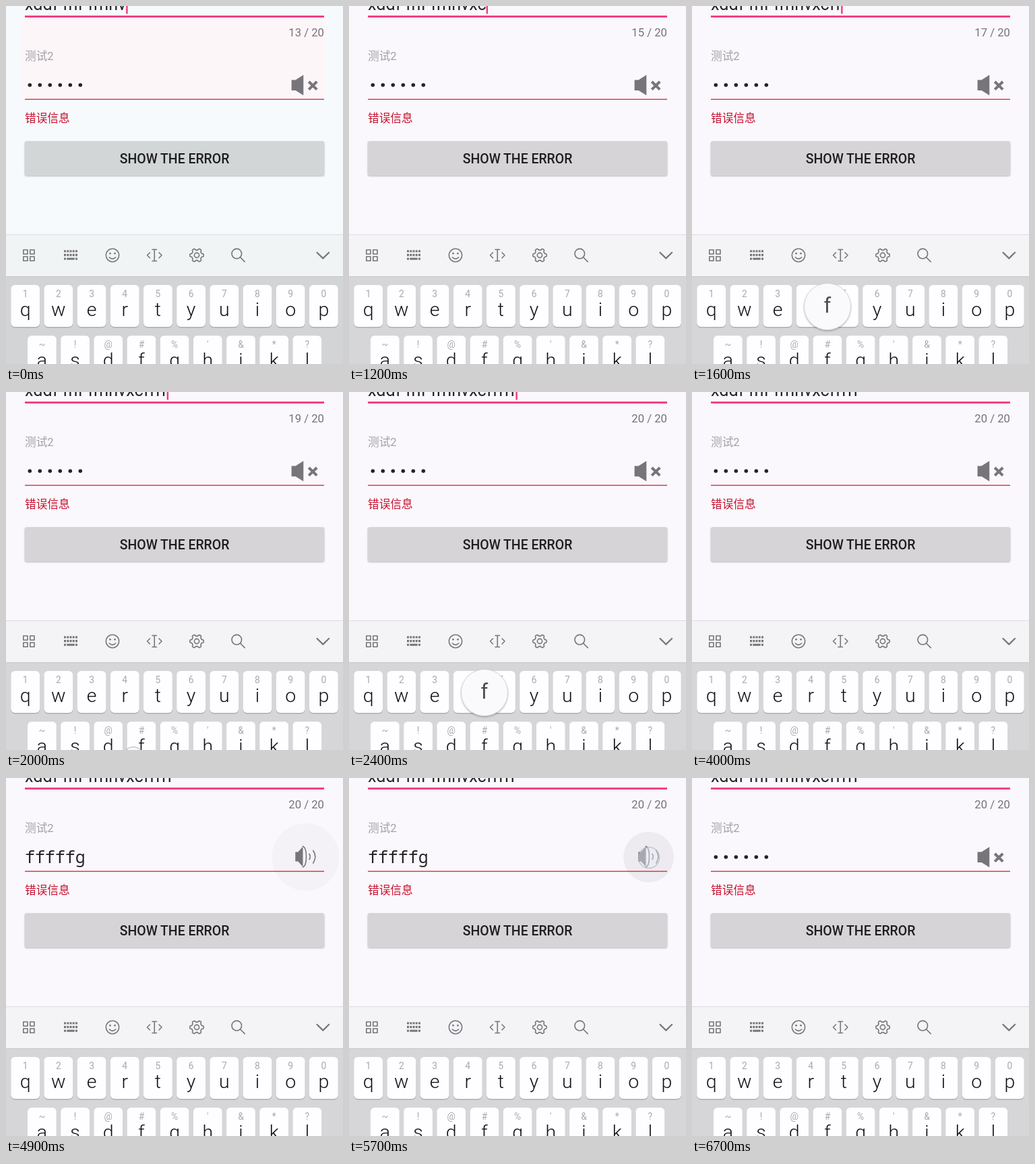
These frames come from a looping animation (500 by 530 pixels, 6.8 s). An HTML page:

```html
<!DOCTYPE html>
<html lang="en">
<head>
<meta charset="utf-8">
<title>Form with keyboard</title>
<style>
html, body { margin: 0; width: 100%; height: 100%; overflow: hidden; }
svg { display: block; font-family: Roboto, "Noto Sans CJK SC", "Noto Sans CJK", sans-serif; font-variant-ligatures: none;
  --page: #faf8fc; --field: #faf8fc; --btn: #d6d4d7; --bar: #f4f3f6; --board: #d6d5d8; }
svg.tint { --page: #f7fafc; --field: #fcf6f9; --btn: #d3d6d7; --bar: #f1f4f5; --board: #d2d4d6; }
.page { fill: var(--page); }
.field { fill: var(--field); }
.btn { fill: var(--btn); }
.bar { fill: var(--bar); }
.board { fill: var(--board); }
.icon { fill: none; stroke: #77757a; stroke-width: 1.6; stroke-linecap: round; stroke-linejoin: round; }
.solid { fill: #77757a; stroke: none; }
.flat { stroke-width: 3.1; stroke-linecap: butt; }
.small { font-size: 16.7px; }
.mid { text-anchor: middle; }
.hint { font-size: 13.8px; fill: #a9a8ac; }
.letter { font-size: 28.5px; font-weight: 300; fill: #111013; }
.mono { font: 300 24.9px "Noto Sans Mono", monospace; }
</style>
</head>
<body>
<svg id="stage" width="500" height="530" viewBox="0 0 500 530">
  <defs>
    <filter id="lift" x="-20%" y="-20%" width="140%" height="150%">
      <feDropShadow dx="0" dy="1.2" stdDeviation="1.3" flood-opacity=".33"/>
    </filter>
    <clipPath id="btnClip"><rect x="28" y="200" width="444" height="50.5" rx="2.5"/></clipPath>
  </defs>

  <rect class="page" width="500" height="530"/>
  <rect class="field" x="22" y="17" width="452" height="121"/>

  <text id="typed" x="28" y="6" font-size="25.2" fill="#242326"></text>
  <rect id="caret" y="0" width="2.4" height="11.5" fill="#f0397f"/>
  <rect x="28" y="14.2" width="444" height="2.8" fill="#f2397f"/>
  <text id="count" class="small" x="472" y="45" text-anchor="end" fill="#757378"></text>

  <text class="small" x="28" y="80" fill="#a3a1a6">测试2</text>
  <circle id="eyeRipple" cx="444.5" cy="117" fill="#000"/>
  <g id="hidden">
    <g id="bullets" fill="#242326"></g>
    <path class="solid" d="M423.6 109.4h6L441.3 102v30.2L429.6 125h-6z"/>
    <path d="M449.2 112l12 11.6M461.2 112l-12 11.6" stroke="#77757a" stroke-width="4"/>
  </g>
  <g id="shown">
    <text class="mono" x="28" y="126" fill="#242326">fffffg</text>
    <path class="solid" d="M429.3 109.500h4L440.500 101.500v30L433.300 123.500h-4z"/>
    <path class="icon" d="M440.500 101q5 2 5 15.500t-5 15.500" stroke-width="2"/>
    <path class="icon" d="M450 112.500q2.600 4 0 8M455.800 107.500q6 9 0 18.500"/>
  </g>
  <rect x="28" y="137.500" width="444" height="1.400" fill="#d8343f"/>
  <text class="small" x="28" y="171.500" fill="#c8102e">错误信息</text>

  <rect id="btnLift" x="28" y="200.500" width="444" height="51" rx="2.500" fill="#b5b4b7" filter="url(#lift)"/>
  <rect class="btn" x="28" y="200" width="444" height="50.500" rx="2.500" filter="url(#lift)"/>
  <g id="btnPress" clip-path="url(#btnClip)">
    <rect x="28" y="200" width="444" height="51" opacity=".015"/>
    <circle id="btnRipple" cx="237" cy="225" opacity=".055"/>
  </g>
  <text class="mid" x="250" y="232.500" font-size="19.450" font-weight="500" fill="#1e1d20">SHOW THE ERROR</text>

  <rect class="bar" y="338" width="500" height="62"/>
  <rect y="338" width="500" height="1" fill="#dcdbde"/>
  <rect class="board" y="400" width="500" height="130"/>
  <rect y="400" width="500" height="1.200" fill="#cac9cc"/>

  <g class="icon">
    <path d="M25.800 361h6.200v6.200h-6.200zM35.800 361h6.200v6.200h-6.200zM25.800 371h6.200v6.200h-6.200zM35.800 371h6.200v6.200h-6.200z"/>
    <path class="flat" d="M86 363h20M86 368.600h20" stroke-dasharray="3 1.250"/>
    <path class="flat" d="M86 374.200h20" stroke-dasharray="3 1.250 11.500 1.250"/>
    <circle cx="158" cy="369" r="9.700"/>
    <path d="M153.300 372q4.700 4.800 9.400 0"/>
    <circle class="solid" cx="154.500" cy="366.300" r="1.400"/><circle class="solid" cx="161.500" cy="366.300" r="1.400"/>
    <path d="M213.500 365l-4 4 4 4M227 365l4 4-4 4M217 360.500h6.500M217 377.500h6.500M220.250 360.500v17"/>
    <path id="gear"/>
    <circle cx="283" cy="369" r="3.600"/>
    <circle cx="342.300" cy="366.700" r="7.300"/>
    <path d="M347.800 372.200l6.400 6.400"/>
    <path d="M461.500 365l8.800 8.600 8.800-8.600" stroke-width="2.200"/>
  </g>

  <g id="keys"></g>

  <g id="popup">
    <circle r="34.500" fill="#faf9fc" stroke="#cfced2" stroke-width=".8" filter="url(#lift)"/>
    <text class="mid" y="9" font-size="31" fill="#4c4b4f"></text>
  </g>
  <circle id="touch" r="15.500" fill="#eaf0f8" fill-opacity=".42" stroke="#a5abb5" stroke-opacity=".6" stroke-width="1.500"/>
</svg>
<script>
const LOOP = 6800, STEP = 100;
const $ = id => document.getElementById(id);
const add = (parent, name, attrs, text = '') => {
  const el = document.createElementNS('http://www.w3.org/2000/svg', name);
  for (const k in attrs) el.setAttribute(k, attrs[k]);
  el.textContent = text;
  parent.appendChild(el);
};
const show = (el, on) => el.setAttribute('visibility', on ? 'visible' : 'hidden');
const place = (el, x, y) => el.setAttribute('transform', `translate(${x} ${y})`);
const clamp = v => Math.max(0, Math.min(1, v));

function keyRow(letters, hints, left, top) {
  [...letters].forEach((ch, i) => {
    const x = left + i * 49.18, mid = x + 21.4;
    add($('keys'), 'rect', { x, y: top + 1.4, width: 42.8, height: 62, rx: 6, fill: '#afaeb2' });
    add($('keys'), 'rect', { x, y: top, width: 42.8, height: 62, rx: 6, fill: '#fefdff' });
    add($('keys'), 'text', { class: 'mid hint', x: mid, y: top + 18 }, hints[i]);
    add($('keys'), 'text', { class: 'mid letter', x: mid, y: top + 46 }, ch);
  });
}
keyRow('qwertyuiop', '1234567890', 7.3, 413);
keyRow('asdfghjkl', "~!@#%'&*?", 32, 488);

for (let i = 0; i < 6; i++) add($('bullets'), 'circle', { cx: 35.3 + 15 * i, cy: 117, r: 2.8 });

let gear = '';
for (let i = 0; i < 72; i++) {
  const a = i * Math.PI / 36, r = 8.9 + 1.3 * Math.tanh(3 * Math.cos(6 * a));
  gear += (i ? 'L' : 'M') + (283 + r * Math.cos(a)).toFixed(2) + ' ' + (369 + r * Math.sin(a)).toFixed(2);
}
$('gear').setAttribute('d', gear + 'z');

const TEXT = 'xddf fhf fmhvxcfffff';
const typedAt = [1000, 1200, 1500, 1600, 1700, 1900, 2200];
// start, end, x, y, letter
const popups = [[900, 1000, 151, 520, 'x'], [1100, 1200, 201, 520, 'c'],
  [1400, 2000, 201, 445, 'f'], [2100, 2600, 201, 445, 'f']];
const touches = [[1400, 1500, 189, 541], [2000, 2200, 189, 541],
  [3200, 3500, 234, 224], [4500, 4700, 445, 118], [5600, 5800, 445, 118]];
const active = (list, t) => list.find(([from, to]) => t >= from && t < to);

function caretOn(t) {
  if (t < 2200) return t < 400 || t >= 900;
  return (t - 2200) % 1000 < 500;
}

function draw(t) {
  $('stage').classList.toggle('tint', t < 200);

  const n = 13 + typedAt.filter(at => t >= at).length;
  $('typed').textContent = TEXT.slice(0, n);
  $('count').textContent = n + ' / 20';
  $('caret').setAttribute('x', 28 + $('typed').getComputedTextLength());
  show($('caret'), caretOn(t));

  const open = t >= 4700 && t < 5800;
  show($('shown'), open);
  show($('hidden'), !open);

  const age = t - (t < 5600 ? 4500 : 5600);
  $('eyeRipple').setAttribute('r', 50 * clamp(0.5 + age / 400));
  $('eyeRipple').setAttribute('opacity', age < 0 ? 0 : 0.05 * clamp((600 - age) / 400));

  const press = t - 3200, held = press < 0 ? 0 : clamp((700 - press) / 400);
  $('btnRipple').setAttribute('r', press < 300 ? 21 + 0.13 * Math.max(0, press) : 60 + 0.5 * (press - 300));
  $('btnPress').setAttribute('opacity', held);
  $('btnLift').setAttribute('opacity', held);

  const pop = active(popups, t), dot = active(touches, t);
  show($('popup'), pop);
  if (pop) {
    place($('popup'), pop[2], pop[3]);
    $('popup').lastElementChild.textContent = pop[4];
  }
  show($('touch'), dot);
  if (dot) place($('touch'), dot[2], dot[3]);
}

const start = performance.now();
function tick() {
  const t = (performance.now() - start) % LOOP;
  draw(Math.floor(t / STEP) * STEP);
  requestAnimationFrame(tick);
}
tick();
</script>
</body>
</html>
```
